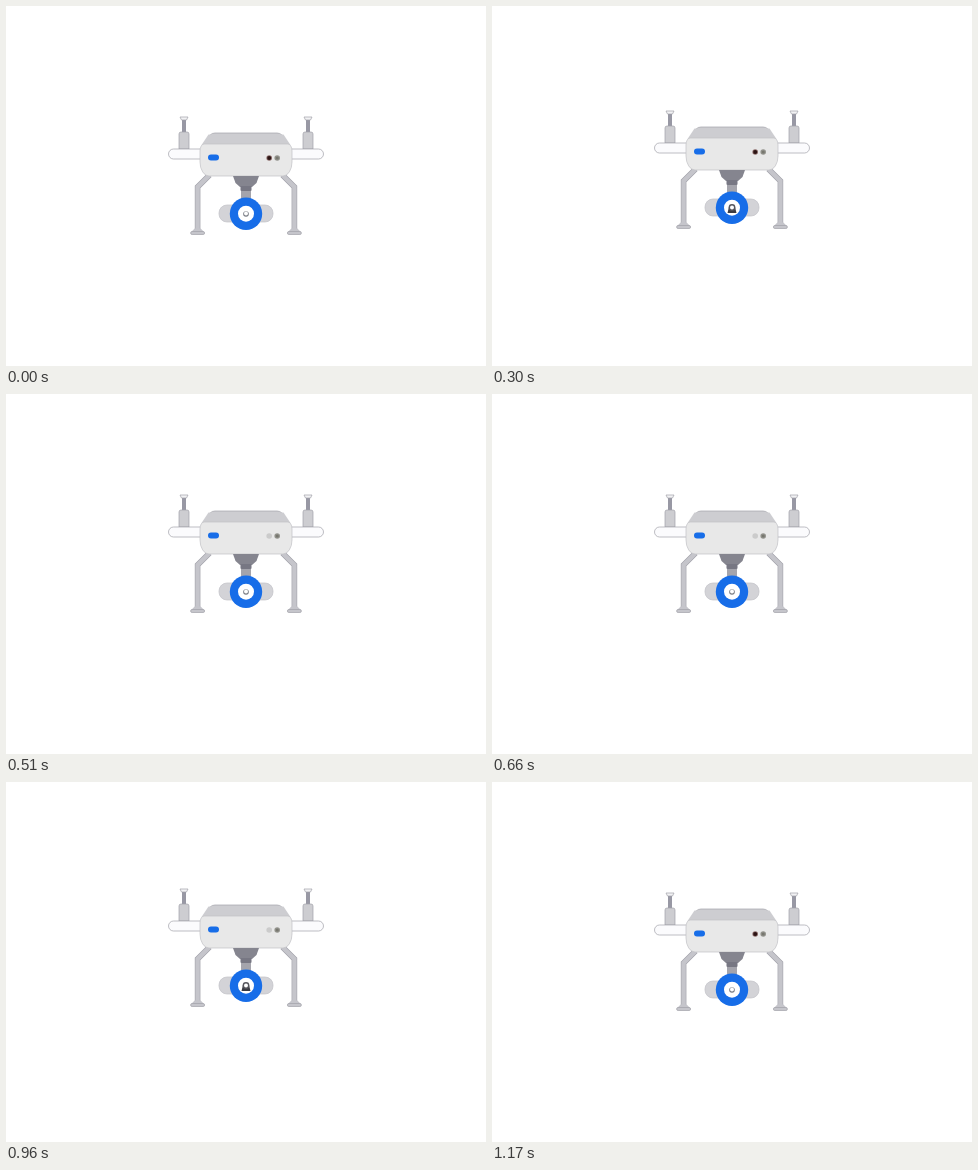
Write an HTML page with a canvas that moves like this. It is 480x360 px and loops after 1200 ms.

```html
<!DOCTYPE html>
<html lang="en">
<head>
<meta charset="utf-8">
<title>Hovering drone</title>
<style>
  html, body { margin: 0; width: 100%; height: 100%; overflow: hidden; background: #fff; }
  canvas { display: block; }
</style>
</head>
<body>
<canvas id="stage" width="480" height="360"></canvas>
<script>
const ctx = document.getElementById('stage').getContext('2d');
const LOOP = 1200, STEP = 30, CYCLE = 1170, LIFT = 11, BLINK = CYCLE / 3;
const CENTER = 240, ARM_X = 178, LEG_X = 191.6;
const BLUE = '#176de8', EDGE = '#a2a2aa', METAL = '#cdcdd1', LEG = '#c5c5cb';

function paint(fill, stroke) {
  ctx.fillStyle = fill;
  ctx.fill();
  if (!stroke) return;
  ctx.strokeStyle = stroke;
  ctx.lineWidth = 0.7;
  ctx.stroke();
}

// Rounded box centred on x.
function box(x, top, width, height, radius, fill, stroke) {
  ctx.beginPath();
  ctx.roundRect(x - width / 2, top, width, height, radius);
  paint(fill, stroke);
}

// Trapezoid centred on x.
function taper(x, top, bottom, topWidth, bottomWidth, fill, stroke) {
  ctx.beginPath();
  ctx.moveTo(x - topWidth / 2, top);
  ctx.lineTo(x + topWidth / 2, top);
  ctx.lineTo(x + bottomWidth / 2, bottom);
  ctx.lineTo(x - bottomWidth / 2, bottom);
  ctx.closePath();
  paint(fill, stroke);
}

function disc(x, y, radius, fill) {
  ctx.beginPath();
  ctx.arc(x, y, radius, 0, Math.PI * 2);
  paint(fill);
}

function mirrored(draw) {
  draw();
  ctx.save();
  ctx.translate(2 * CENTER, 0);
  ctx.scale(-1, 1);
  draw();
  ctx.restore();
}

function drawRotor() {
  box(ARM_X, 113, 4, 14, 0, '#9898a4');
  taper(ARM_X, 111, 114, 8, 5, '#f2f2f4', EDGE);
  box(ARM_X, 126, 10, 17, [2, 2, 0, 0], METAL, EDGE);
  box(ARM_X + 2.5, 143, 36, 10, [5, 0, 0, 5], '#fbfbfd', EDGE);
}

function drawLeg() {
  ctx.beginPath();
  ctx.moveTo(LEG_X + 12, 169);
  ctx.lineTo(LEG_X, 181);
  ctx.lineTo(LEG_X, 223);
  for (const [width, color] of [[5.6, EDGE], [4.4, LEG]]) {
    ctx.lineWidth = width;
    ctx.strokeStyle = color;
    ctx.stroke();
  }
  taper(LEG_X, 222.5, 226, 6, 13, LEG);
  box(LEG_X, 225.5, 14, 3, 1.5, LEG, EDGE);
}

function drawBody(lit) {
  box(CENTER, 127, 76, 12, [7, 7, 0, 0], METAL, EDGE);
  taper(CENTER, 128.5, 139, 75, 89, METAL);
  const shoulder = { x: 4, y: 7 }, belly = { x: 9, y: 14 };
  box(CENTER, 138, 92, 32, [shoulder, shoulder, belly, belly], '#e8e8e8', '#c0c0c4');
  box(207.5, 148.5, 11, 6, 3, BLUE);
  disc(263.2, 152, 2.8, lit ? '#cbcbcb' : '#8a6a68');
  if (!lit) disc(263.2, 152, 2, '#2c1414');
  disc(271.2, 152, 2.8, '#94948e');
  disc(271.2, 152, 1.6, '#77776f');
}

function drawCamera(shaded) {
  taper(CENTER, 170, 177, 26, 21, '#85858f');
  taper(CENTER, 177, 181, 21, 12, '#85858f');
  box(CENTER, 180, 11, 5, 1, '#777783');
  box(CENTER, 185, 10, 9, 0, '#a4a4ac');
  box(CENTER, 199, 54, 17, 8, '#d3d3d7', '#c2c2c8');
  disc(CENTER, 207.7, 16.2, BLUE);
  disc(CENTER, 207.7, 8, '#fff');
  if (shaded) {
    taper(CENTER, 207, 213, 6, 9, '#3b3b42');
    disc(CENTER, 207.5, 3.4, '#55555c');
  } else {
    disc(CENTER, 208, 2.8, '#777a82');
  }
  disc(CENTER, 207.5, 2, '#fff');
}

function draw(time) {
  const rise = 1 - Math.abs(2 * time / CYCLE - 1);
  ctx.fillStyle = '#fff';
  ctx.fillRect(0, 0, 480, 360);
  ctx.save();
  ctx.translate(0, -Math.round(LIFT * rise));
  mirrored(drawRotor);
  mirrored(drawLeg);
  drawBody(Math.cos(2 * Math.PI * time / BLINK) < 0);
  drawCamera(Math.abs(rise - 0.5) < 0.25);
  ctx.restore();
}

function tick() {
  const time = performance.now() % LOOP;
  draw(Math.floor(time / STEP) * STEP);
  requestAnimationFrame(tick);
}
tick();
</script>
</body>
</html>
```
